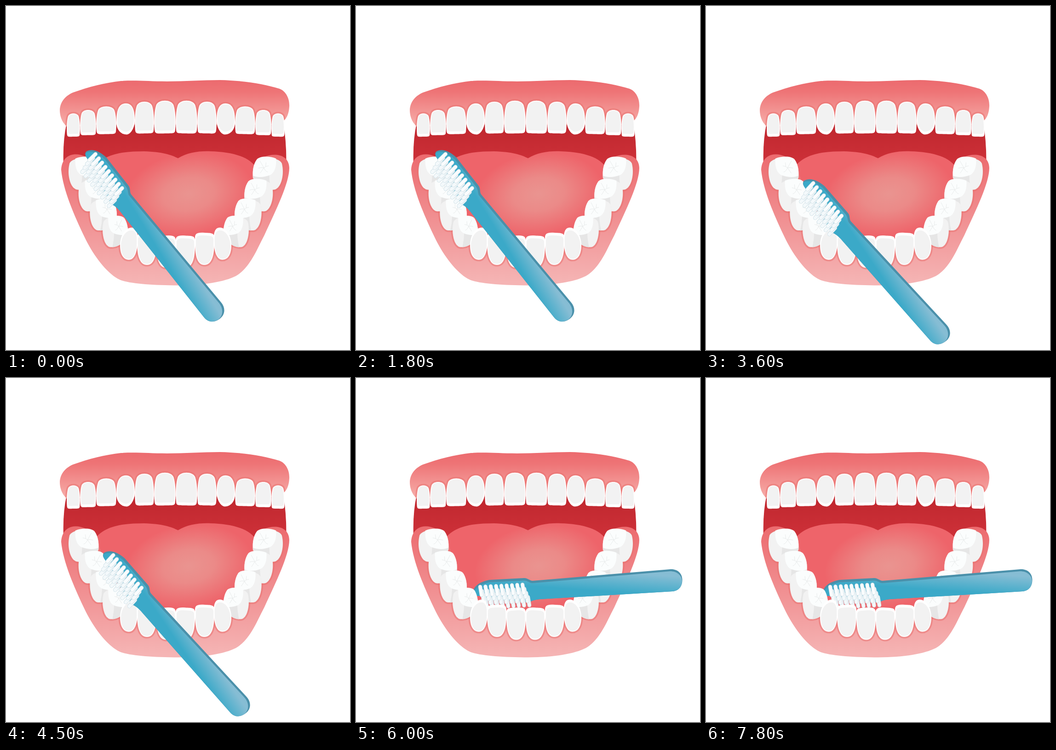
Write an HTML page that moves like this. It is 748 by 748 pixels and loops after 8.1 s.

```html
<!DOCTYPE html>
<html lang="en">
<head>
<meta charset="utf-8">
<title>Brushing teeth</title>
<style>
  html, body { margin: 0; width: 100%; height: 100%; overflow: hidden; background: #fff; }
  svg { display: block; width: 100vw; height: 100vh; }
</style>
</head>
<body>
<svg id="stage" viewBox="0 0 748 748">
  <defs>
    <linearGradient id="upperFill" x1="0" y1="163" x2="0" y2="258" gradientUnits="userSpaceOnUse">
      <stop stop-color="#ec6b6f"/><stop offset=".25" stop-color="#ee7476"/><stop offset="1" stop-color="#f6aca8"/>
    </linearGradient>
    <linearGradient id="lowerFill" x1="0" y1="325" x2="0" y2="600" gradientUnits="userSpaceOnUse">
      <stop stop-color="#ec6b6f"/><stop offset="1" stop-color="#f5b4b4"/>
    </linearGradient>
    <linearGradient id="throatFill" x1="0" y1="255" x2="0" y2="340" gradientUnits="userSpaceOnUse">
      <stop stop-color="#bf272e"/><stop offset="1" stop-color="#cd3038"/>
    </linearGradient>
    <radialGradient id="tongueFill" cx="0" cy="0" r="100" gradientUnits="userSpaceOnUse"
      gradientTransform="translate(397 409) rotate(-9) scale(1.4 .9)">
      <stop stop-color="#ea9490"/><stop offset=".4" stop-color="#eb8a88"/><stop offset="1" stop-color="#ee646a"/>
    </radialGradient>
    <linearGradient id="handleFill" x1="600" y1="468" x2="603" y2="425" gradientUnits="userSpaceOnUse">
      <stop stop-color="#3ba9c8"/><stop offset="1" stop-color="#86bdd4"/>
    </linearGradient>
    <path id="upperGum" d="M132 262C121 252 117 239 117 226 118 207 130 195 146 188 180 176 214 167 250 163 285 161 310 164 350 164 390 164 425 161 465 161 515 162 560 169 595 180 610 186 617 203 616 219 615 235 610 245 603 250Q590 262 550 258H180Q150 264 132 262Z"/>
    <path id="lowerGum" d="M172 327C150 317 122 322 120 356 124 400 148 455 172 505 190 542 217 578 243 593 260 603 310 607 375 607.500 430 607 475 600 500 587 531 569 546 528 562 498 587 444 616 385 616 352 615 320 580 320 562 328 535 345 535 400 510 450 485 495 430 512 375 515 310 513 250 490 225 430 210 400 205 345 172 327Z"/>
    <clipPath id="upperClip"><use href="#upperGum"/></clipPath>
    <clipPath id="lowerClip"><use href="#lowerGum"/></clipPath>
  </defs>
  <path fill="url(#throatFill)" d="M133 250H602Q610 290 609.500 345H125Q123 290 133 250Z"/>
  <path fill="url(#tongueFill)" d="M190 355C210 321 255 316 300 316 340 317 360 324 374 331 394 319 418 315 445 316 490 317 534 328 545 355L535 440 480 520H270L200 430Z"/>
  <use href="#upperGum" fill="url(#upperFill)"/>
  <use href="#lowerGum" fill="url(#lowerFill)"/>
  <g id="upperHalo" clip-path="url(#upperClip)"/>
  <g id="lowerHalo" clip-path="url(#lowerClip)"/>
  <g id="backTeeth"/>
  <g id="frontTeeth"/>
  <g id="brush">
    <path fill="#4a90aa" d="M254 466C256 452 270 443 290 439L365 435C374 434.500 377 441 384 441L682 416C698 414.500 709 424 709.500 438 710 453 702 463 688 464L400 481Q386 482 378 487L300 482 268 474Q254 474 254 466Z"/>
    <path fill="url(#handleFill)" d="M256 469C258 456 272 448 290 444L364 440.500C373 440 377 446 384 446L680 420.500C696 419 708 428 709 441 709 454 701 463 688 464L400 481Q386 482 378 487L300 482 268 474Q258 474 256 469Z"/>
    <g id="bristles" stroke-linecap="round"/>
  </g>
</svg>
<script>
const $ = id => document.getElementById(id);
const stage = $('stage'), brush = $('brush'), front = $('frontTeeth'), back = $('backTeeth');
const upperHalo = $('upperHalo'), lowerHalo = $('lowerHalo');
const middle = 369;

function draw(parent, d, attrs) {
  const path = document.createElementNS('http://www.w3.org/2000/svg', 'path');
  for (const [key, value] of Object.entries({ d, ...attrs })) path.setAttribute(key, value);
  parent.append(path);
}

// Outlines live in a 100 x 100 box.
const shapes = {
  incisor: 'M2 88C-2 60 2 30 10 14 20-4 80-4 90 14 98 30 102 60 98 88 97 102 88 99 50 100 12 101 4 102 2 88Z',
  canine: 'M0 60C0 20 15 0 52 0 90 0 100 25 100 55 100 80 75 100 56 100 25 100 0 85 0 60Z',
  lower: 'M0 12C3 2 12 1 50 0 90-2 99 3 100 14 102 60 95 100 52 100 6 100-2 60 0 12Z',
  lowerCanine: 'M0 55C0 20 35 0 65 0 90 0 100 15 98 40 98 75 80 100 50 100 15 100 0 80 0 55Z',
  molar: 'M5 20C12 2 75-6 87 8 98 22 102 45 100 62 92 80 85 84 70 91 60 98 30 104 22 96 8 88-4 55 5 20Z'
};
const crown = 'M24 5C45-3 78-3 87 8 98 22 102 42 99 57 85 63 65 62 46 56 30 50 22 32 24 5Z';
const shade = 'M46 54C65 62 85 63 100 57 96 82 60 100 40 100 43 86 47 70 46 54Z';
const fissure = 'M48 27Q58 28 64 33L77 12M64 33Q72 31 82 34M64 33L76 49M64 33Q60 43 51 46M58 29L57 17';

// Sides: -1 is left, 1 is its mirror image on the right.
function tooth(parent, kind, side, distance, top, w, h) {
  const d = shapes[kind], upper = top < 300;
  const place = (x, y, dw, dh) => `translate(${middle + side * (distance - dw / 2 + x)} ${top + y})
    scale(${-side * dw / 100} ${dh / 100}) translate(${-100} 0)`;
  const transform = place(0, 0, w, h);
  const line = { transform, fill: 'none', 'vector-effect': 'non-scaling-stroke' };
  draw(upper ? upperHalo : lowerHalo, d, { ...line, stroke: '#e9706f', 'stroke-opacity': .5, 'stroke-width': 7 });
  if (kind === 'molar') {
    draw(parent, d, { transform, fill: '#f2f2f2' });
    draw(parent, shade, { transform, fill: '#e6e6e6' });
    draw(parent, crown, { transform, fill: '#fbfdfd' });
    draw(parent, fissure, { ...line, stroke: '#e8ebeb' });
  } else {
    draw(parent, d, { transform, fill: '#fff' });
    draw(parent, d, { transform: place(0, upper ? 2 : 6, w - 4, h - 8), fill: '#f2f2f2' });
  }
}

for (const side of [-1, 1]) {
  let edge = 0;
  [47, 42, 40, 44, 35, 29].forEach((w, i) => {
    const distance = edge + w / 2, bend = (distance / 222) ** 2;
    const top = 205 + 28 * bend, bottom = 277 + 7 * bend * bend;
    const canine = i === 2;
    tooth(back, canine ? 'canine' : 'incisor', side, distance, top, w, bottom - top + (canine ? 2 : 0));
    edge += w;
  });

  for (let i = 3; i >= 0; i--) {
    tooth(i || side > 0 ? back : front, 'molar', side,
      132 + 27.5 * i - 1.5 * i * i, 456.5 - 35 * i - 2.6 * i * i, 56 + 3.5 * i, 68 + 1.3 * i);
  }
}
for (const side of [-1, 1]) {
  for (const distance of [101.5, 63, 21]) {
    const canine = distance > 100;
    tooth(canine && side > 0 ? back : front, canine ? 'lowerCanine' : 'lower', side, distance,
      500 - 18 * (distance / 101) ** 2, canine ? 39 : 42, 70);
  }
}

for (let row = 3; row >= 0; row--) {
  for (let i = 0; i < 9; i++) {
    const d = `M${270 + 11.5 * i + row * 4} ${454 - .6 * i + row * 9}l3 18`;
    draw($('bristles'), d, { stroke: '#d5e4ea', 'stroke-width': 8.5 });
    draw($('bristles'), d, { stroke: row ? '#f4f9fb' : '#fafcfd', 'stroke-width': 6.5 });
  }
}

// Neck position, angle, size and full sweep at each brushing place.
const places = [
  { x: 271, y: 408, angle: 55, size: 1.02, dx: 14, dy: -21 },
  { x: 314, y: 467, angle: 52, size: 1.02, dx: 15, dy: -9 },
  { x: 382, y: 460, angle: 0, size: 1, dx: 0, dy: -19 }
];
let shown = -1;

function frame(now) {
  const step = Math.floor(now / 300) % 27;
  if (step !== shown) {
    shown = step;
    const index = Math.floor(step / 9), sweep = step % 3 / 2;
    const { x, y, angle, size, dx, dy } = places[index];
    brush.setAttribute('transform',
      `translate(${x + dx * sweep} ${y + dy * sweep}) rotate(${angle}) scale(${size}) translate(-382 -441)`);
    stage.insertBefore(brush, index === 2 ? front : null);
  }
  requestAnimationFrame(frame);
}
frame(performance.now());
</script>
</body>
</html>
```
